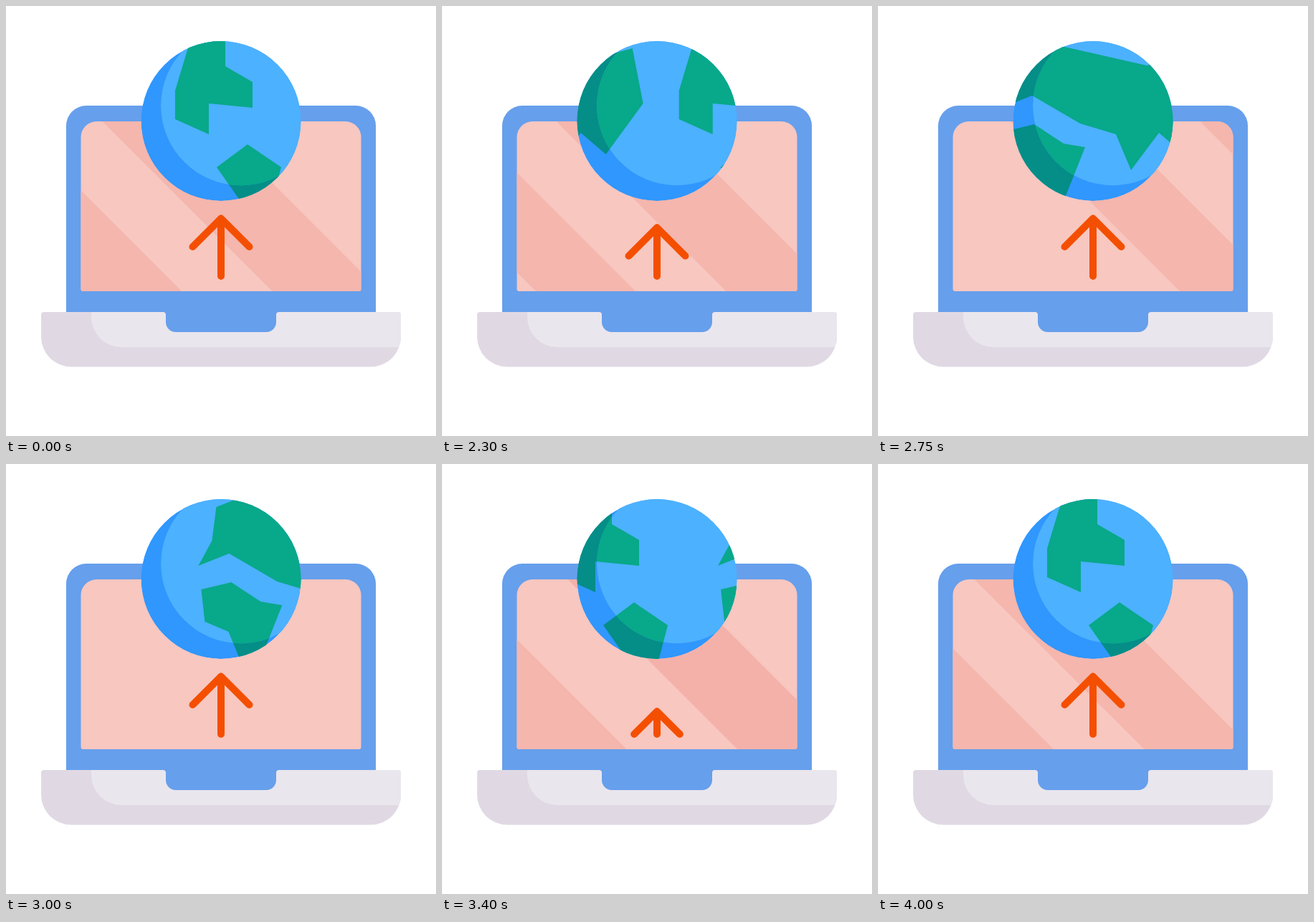
An HTML page with a canvas for the animation above (4020 ms loop, 600x600 px).

```html
<!DOCTYPE html>
<html lang="en">
<head>
<meta charset="utf-8">
<title>Upload to the web</title>
<style>
  html, body { margin: 0; width: 100%; height: 100%; overflow: hidden; background: #fff; }
  canvas { display: block; }
</style>
</head>
<body>
<canvas id="stage" width="600" height="600"></canvas>
<script>
const ctx = document.getElementById('stage').getContext('2d');
const LOOP = 4020, MOVE = 2000, HOLD = 1995;
const MAP_WIDTH = 575;

// One turn of the map; the island appears twice
const world = new Path2D('M236 118v40l47 21v-43l61 6v-36l-38-22V45h-48z');
const island = new Path2D('M337 193l47 32-13 50h-42l-35-50z');
world.addPath(island);
world.addPath(island, new DOMMatrix().translate(371, 62));
world.addPath(new Path2D('M458 175l42-10 41 27 30 5-31 78h-27l-17-41-33-14z'));
world.addPath(new Path2D(
  'M479 60l-6 47-19 35 43-17 67 39 50 15 21 50 39-52 35 30 52-71-15-77-89 24-150-34z'));

function fillRound(color, x, y, w, h, radii) {
  ctx.fillStyle = color;
  ctx.beginPath();
  ctx.roundRect(x, y, w, h, radii);
  ctx.fill();
}

// Cubic curve easing with handles (.14, 0) and (.517, 1)
function ease(u) {
  let lo = 0, hi = 1, p;
  for (let i = 0; i < 24; i++) {
    p = (lo + hi) / 2;
    const x = 3 * (1 - p) ** 2 * p * .14 + 3 * (1 - p) * p * p * .517 + p ** 3;
    if (x < u) lo = p; else hi = p;
  }
  return p * p * (3 - 2 * p);
}

// Diagonal band; right is x - y along its right edge
function band(color, right, width) {
  ctx.fillStyle = color;
  ctx.setTransform(1, 0, 1, 1, right, 0);
  ctx.fillRect(-width, 150, width, 260);
  ctx.resetTransform();
}

function drawScreen(time) {
  ctx.save();
  fillRound('#f7c7c0', 104.5, 161, 391, 237, [22, 22, 3, 3]);
  ctx.clip();
  // Two bands speed out to the right, then slow in from the left
  const shift = time < MOVE / 2
    ? 113.5 * (time / 525) ** 2.8
    : -95.5 * ((MOVE - time) / 395) ** 2.5;
  band('#f4b6ad', shift - 153, 139);
  band('#f4b6ad', shift + 124.5, 151);
  // A single band sweeps across ahead of them
  if (time > MOVE / 2) band('#f4b1a9', 165 + 1.34 * (time - 1405), 152);
  ctx.restore();
}

function drawLaptop(time) {
  fillRound('#669fec', 84, 139, 432, 290, [28, 28, 0, 0]);
  drawScreen(time);

  ctx.save();
  fillRound('#e0d9e4', 49, 427, 502, 76.5, [4, 4, 42, 42]);
  ctx.clip();
  fillRound('#eae6ed', 119, 420, 440, 56, [0, 0, 0, 42]);
  ctx.restore();

  ctx.fillStyle = '#669fec';
  ctx.fill(new Path2D('M219 427q4 0 4 4v10a14 14 0 0 0 14 14h126a14 14 0 0 0 14-14v-10q0-4 4-4z'));
}

// The arrow shrinks to its foot and grows back once a second
function drawArrow(time) {
  const apart = Math.abs(time % 1000 - 460) / 292;
  const foot = 377;
  const top = foot - 80.5 * (1 - Math.max(0, 1 - apart) ** 2.46);
  const arm = Math.min(39.5, foot - top);
  ctx.strokeStyle = '#f44f00';
  ctx.lineWidth = 10;
  ctx.lineCap = ctx.lineJoin = 'round';
  ctx.beginPath();
  ctx.moveTo(300 - arm, top + arm);
  ctx.lineTo(300, top);
  ctx.lineTo(300 + arm, top + arm);
  ctx.moveTo(300, top);
  ctx.lineTo(300, foot);
  ctx.stroke();
}

function drawSurface(x, y, sea, land, dx) {
  ctx.beginPath();
  ctx.arc(x, y, 111.5, 0, 7);
  ctx.clip();
  ctx.fillStyle = sea;
  ctx.fill();
  ctx.fillStyle = land;
  for (const turn of [0, MAP_WIDTH]) {
    ctx.setTransform(1, 0, 0, 1, dx + turn, 0);
    ctx.fill(world);
  }
  ctx.resetTransform();
}

function drawGlobe(time) {
  const dx = MAP_WIDTH * (ease(time / MOVE) - 1);
  ctx.save();
  drawSurface(300, 160.5, '#3097fe', '#048e87', dx);
  drawSurface(327.5, 139, '#4cb1ff', '#08a88a', dx);
  ctx.restore();
}

function frame(now) {
  const time = Math.min(MOVE, Math.max(0, now % LOOP - HOLD));
  ctx.fillStyle = '#fff';
  ctx.fillRect(0, 0, 600, 600);
  drawLaptop(time);
  drawArrow(time);
  drawGlobe(time);
  requestAnimationFrame(frame);
}
frame(0);
</script>
</body>
</html>
```
